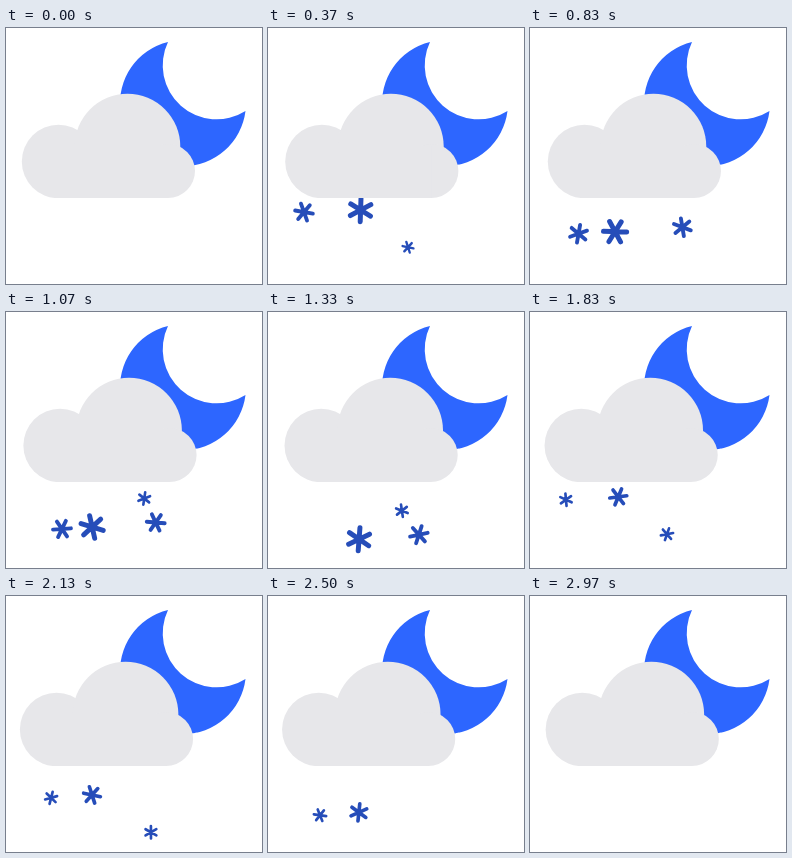
Animation, 256 px wide and 256 px high, one loop 3.01 s. Source, as an HTML page:

```html
<!DOCTYPE html>
<html lang="en">
<head>
<meta charset="utf-8">
<title>Snowy night</title>
<style>
  html, body { margin: 0; width: 100%; height: 100%; overflow: hidden; background: #fff; }
  svg { display: block; width: 100vw; height: 100vh; }
  .moon { fill: #2d66ff; }
  .cloud { fill: #e7e7ea; }
  .flake { stroke: #264db9; stroke-width: .36; stroke-linecap: round; fill: none; }
</style>
</head>
<body>
<svg viewBox="0 0 256 256">
  <defs>
    <clipPath id="base"><rect width="256" height="170"/></clipPath>
  </defs>
  <path class="moon" d="M162 14A63 63 0 1 0 239.5 83A54 54 0 0 1 162 14Z"/>
  <g id="snow"></g>
  <g id="cloud" class="cloud" clip-path="url(#base)">
    <circle cx="52.5" cy="133.5" r="36.7"/>
    <circle cx="121.5" cy="118.5" r="52.8"/>
    <circle cx="162" cy="143" r="27"/>
    <rect x="52" y="118" width="110" height="52"/>
  </g>
</svg>
<script>
// Times in seconds, lengths in stage pixels, angles in degrees
const LOOP = 3.01;
const LIFE = 1.4;
const GROW = 0.15;
const SNOW_FROM = 0.03, SNOW_TO = 2.8;
const FALL = 47;
const SPIN = 65;
const SWAY = 16, SWAY_RATE = 2;

// x is the leftmost point of the sway, reached at time turn;
// y is the height at birth, angle the tilt at time turn
const flakes = [
  { r: 10.7, born: -0.12, x: 33, y: 161, turn: 0.06, angle: 20, dir: 1 },
  { r: 13.8, born: 0.05, x: 85, y: 167, turn: 0.88, angle: 35, dir: 1 },
  { r: 6.6, born: -0.57, x: 140, y: 175, turn: 0.4, angle: -16, dir: 1 },
  { r: 10.7, born: 0.38, x: 149.6, y: 178, turn: 1.13, angle: 31, dir: -1 },
  { r: 7.4, born: 0.89, x: 133.2, y: 178, turn: 1.48, angle: 42, dir: -1 },
  { r: 7.4, born: 1.39, x: 20.6, y: 167, turn: 1.065, angle: 5, dir: 1 },
  { r: 10.2, born: 1.6, x: 86, y: 174, turn: 2.1, angle: -20, dir: 1 }
];

const snow = document.getElementById("snow");
const cloud = document.getElementById("cloud");

// Three crossing arms inside a unit circle
const star = [0, 60, 120].map(deg => {
  const a = deg * Math.PI / 180;
  const x = 0.84 * Math.sin(a), y = 0.84 * Math.cos(a);
  return `M${-x} ${-y}L${x} ${y}`;
}).join("");

for (const flake of flakes) {
  flake.el = document.createElementNS("http://www.w3.org/2000/svg", "path");
  flake.el.setAttribute("class", "flake");
  flake.el.setAttribute("d", star);
  snow.append(flake.el);
}

function drawFlake({ el, r, born, x, y, turn, angle, dir }, t) {
  const age = t - born;
  const shown = age > 0 && age < LIFE && t >= SNOW_FROM && t < SNOW_TO;
  el.style.display = shown ? "" : "none";
  if (!shown) return;
  const left = x + SWAY * (1 - Math.cos(SWAY_RATE * (t - turn)));
  const top = y + FALL * age;
  const tilt = angle + dir * SPIN * (t - turn);
  const size = r * Math.min(1, age / GROW);
  el.setAttribute("transform", `translate(${left} ${top}) rotate(${tilt}) scale(${size})`);
}

function draw(t) {
  const drift = 2 * Math.sin(2 * Math.PI * t / LOOP);
  cloud.setAttribute("transform", `translate(${drift} 0)`);
  for (const flake of flakes) drawFlake(flake, t);
}

const begin = performance.now();
function tick() {
  draw((performance.now() - begin) / 1000 % LOOP);
  requestAnimationFrame(tick);
}
tick();
</script>
</body>
</html>
```
